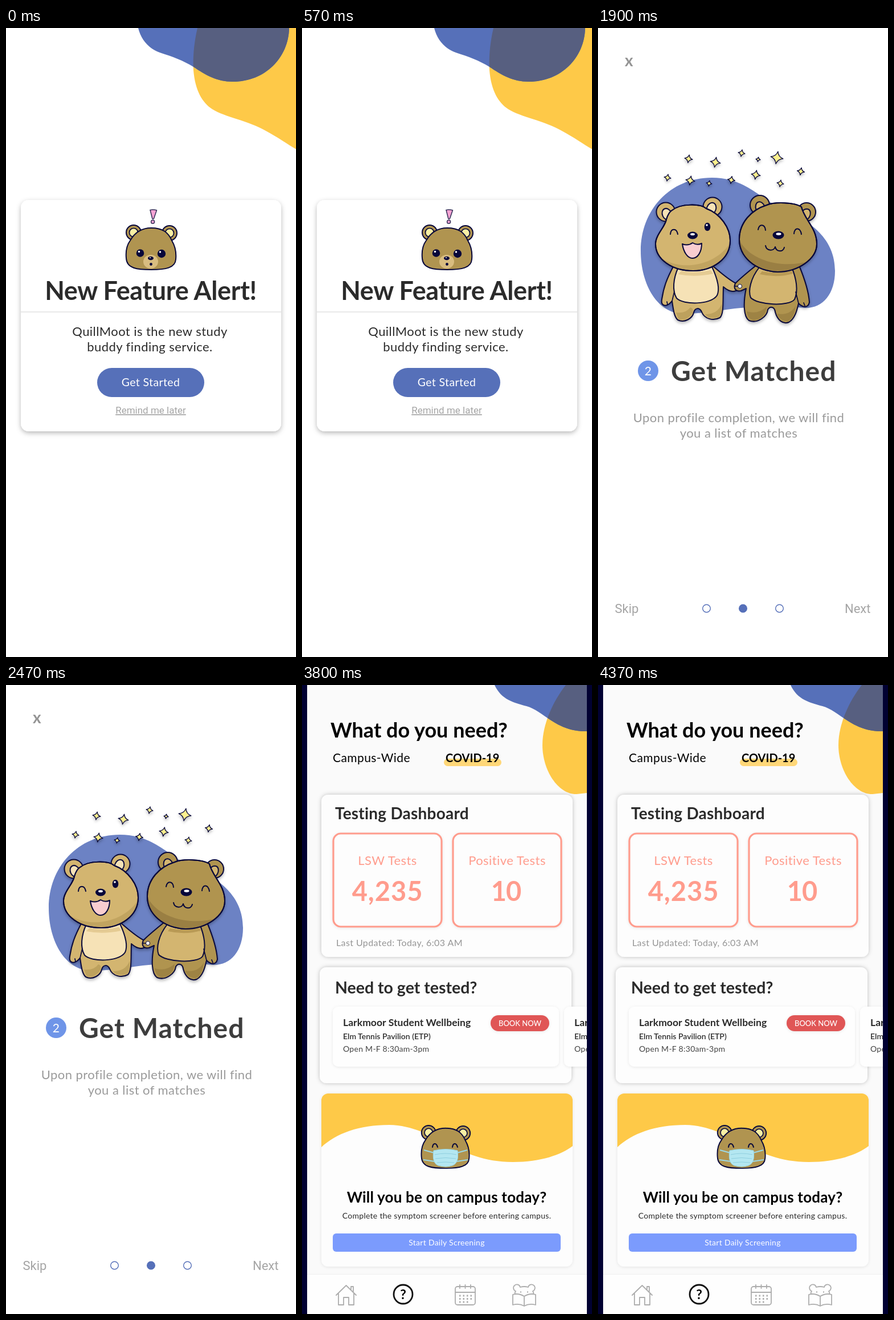
Write an HTML page that moves like this. It is 509 px wide and 1101 px high and loops after 4750 ms.

```html
<!DOCTYPE html>
<html lang="en">
<head>
<meta charset="utf-8">
<title>Study app onboarding</title>
<style>
  html, body { margin: 0; width: 100%; height: 100%; overflow: hidden; background: #fff; }
  svg { display: block; width: 100vw; height: 100vh; }
  text { font-family: Lato, "Open Sans", sans-serif; letter-spacing: .02em; fill: #2b2b2b; }
  .mid { text-anchor: middle; }
  .semi { font-weight: 600; }
  .bold { font-weight: 700; }
  .title { font-size: 48px; font-weight: 700; fill: #3d3d3d; letter-spacing: .022em; }
  .note { font-size: 22px; fill: #9a9a9a; text-anchor: middle; }
  .ui { font-family: Roboto, sans-serif; font-size: 22px; fill: #a5a5a5; letter-spacing: 0; }
  .num { font-size: 21px; fill: #fff; text-anchor: middle; }
  .small { font-size: 14px; }
  .white { fill: #fff; }
  .black { fill: #000; }
  .coral text { fill: #ff9c8d; }
  .ink { stroke: #07073a; stroke-width: 2.6; stroke-linecap: round; stroke-linejoin: round; }
  .fine { stroke-width: 2; }
  .thin { stroke-width: 1.7; }
  .thick { stroke-width: 3.2; }
  .line { fill: none; }
  .dark { fill: #b09450; }
  .light { fill: #d3b570; }
  .cream { fill: #f6e2b6; }
  .shade { fill: #93793f; }
  .navy { fill: #07073a; }
  .blue { fill: #5670b9; }
  .yellow { fill: #fec948; }
  .icon { fill: none; stroke: #adadad; stroke-width: 1.8; stroke-linejoin: round; stroke-linecap: round; }
</style>
</head>
<body>
<svg viewBox="0 0 509 1101" preserveAspectRatio="none">
  <defs>
    <filter id="soft" x="-20%" y="-20%" width="140%" height="150%">
      <feDropShadow dx="0" dy="3" stdDeviation="2.5" flood-color="#000" flood-opacity=".27"/>
    </filter>
    <filter id="card" x="-10%" y="-10%" width="120%" height="125%">
      <feDropShadow dx="0" dy="3" stdDeviation="4" flood-color="#000" flood-opacity=".28"/>
    </filter>
    <filter id="panel" x="-10%" y="-10%" width="120%" height="120%">
      <feDropShadow dx="0" dy="0" stdDeviation="3.5" flood-color="#000" flood-opacity=".25"/>
    </filter>
    <filter id="faint" x="-10%" y="-10%" width="120%" height="130%">
      <feDropShadow dx="0" dy="1" stdDeviation="2.5" flood-color="#000" flood-opacity=".09"/>
    </filter>
    <path id="sunA" d="M336 0C329 30 328 55 329 74C332 110 345 131 362 142C384 156 425 162 456 180C477 191 493 203 509 212V0Z"/>
    <path id="skyA" d="M232 0C237 20 250 36 270 43C292 50 311 57 329 68C350 82 370 94 398 94C455 94 496 52 497 0Z"/>
    <path id="sunB" d="M463 0C441 28 422 68 422 105C422 150 450 192 482 191L500 189V0Z"/>
    <path id="skyB" d="M338 0C350 26 372 31 394 37C424 45 446 82 500 81V0Z"/>
    <path id="headL" d="M130 319C145 307 180 307 190 316C215 325 232 350 232 372C232 405 200 425 167 425C130 425 101 405 101 378C101 362 118 348 120 335C122 328 125 322 130 319Z"/>
    <path id="headR" d="M296 310C310 304 345 305 357 313C362 335 384 350 384 378C384 405 350 427 315 427C275 425 248 400 248 370C248 340 270 318 296 310Z"/>
    <path id="star" d="M0-1Q.18-.18 1 0Q.18.18 0 1Q-.18.18-1 0Q-.18-.18 0-1Z"/>
    <clipPath id="inSunA"><use href="#sunA"/></clipPath>
    <clipPath id="inSunB"><use href="#sunB"/></clipPath>
    <clipPath id="inHeadL"><use href="#headL"/></clipPath>
    <clipPath id="inHeadR"><use href="#headR"/></clipPath>
    <clipPath id="screen"><rect x="9" width="491" height="1101"/></clipPath>
    <clipPath id="promo"><rect x="34" y="715" width="441" height="303" rx="12"/></clipPath>
    <g id="face" class="ink fine">
      <circle class="dark" cx="224" cy="358" r="13"/>
      <circle class="dark" cx="287" cy="359" r="13"/>
      <g class="thin" fill="#f8efa4">
        <circle cx="224" cy="358" r="7.5"/><circle cx="287" cy="359" r="7.5"/>
      </g>
      <path class="dark" d="M255 350C275 350 285 358 291 372C297 382 299 395 298 405C297 420 280 423 255 423C230 423 212 421 211 403C210 392 212 380 218 372C226 358 238 350 255 350Z"/>
    </g>
  </defs>

  <g class="scene">
    <rect width="509" height="1101" fill="#fff"/>
    <use href="#sunA" class="yellow"/>
    <use href="#skyA" class="blue"/>
    <use href="#skyA" fill="#575f80" clip-path="url(#inSunA)"/>
    <rect x="26" y="301" width="457" height="405" rx="14" fill="#fff" filter="url(#card)"/>
    <path d="M26 497H483" stroke="#e2e2e2" stroke-width="1.5"/>
    <use href="#face"/>
    <ellipse cx="254" cy="409" rx="13" ry="12" fill="#d9bd80"/>
    <g class="navy">
      <circle cx="235.5" cy="394" r="6.8"/><circle cx="273" cy="395" r="7.2"/>
      <ellipse cx="254" cy="403" rx="5" ry="3.2"/><circle cx="254.5" cy="413.5" r="2.4"/>
    </g>
    <g class="white">
      <circle cx="233.5" cy="391.5" r="1.7"/><circle cx="270.5" cy="392" r="1.7"/><circle cx="253" cy="402" r="1"/>
    </g>
    <g fill="#f6a3d3" stroke="#34305a" stroke-width="1.5" stroke-linejoin="round">
      <path d="M253 318.500Q259 317.500 264.500 319L259.500 333.500Q258 335 256.800 333.500Z"/>
      <circle cx="257.6" cy="339.3" r="3"/>
    </g>
    <text class="mid bold" x="254" y="476" font-size="45" style="letter-spacing:-.008em">New Feature Alert!</text>
    <text class="mid" x="252.5" y="539" font-size="22">QuillMoot is the new study</text>
    <text class="mid" x="252.5" y="566" font-size="22">buddy finding service.</text>
    <rect class="blue" x="160" y="595" width="188" height="51" rx="25.5"/>
    <text class="mid white" x="254" y="627" font-size="19.5">Get Started</text>
    <text class="ui mid" x="254" y="675" style="font-size:17px" text-decoration="underline">Remind me later</text>
  </g>

  <g class="scene">
    <rect width="509" height="1101" fill="#fff"/>
    <path filter="url(#soft)" fill="#fdc3bd" d="M248 293C305 293 401 335 401 405C401 435 385 452 355 464C310 480 260 517 190 518C140 518 110 490 110 458C110 425 150 405 172 366C195 325 200 293 248 293Z"/>
    <g class="ink" filter="url(#soft)">
      <path d="M117 418L152 474" style="stroke-width:12"/>
      <path d="M117 418L152 474" style="stroke:#fbb9e6;stroke-width:7"/>
      <rect x="154" y="476" width="73" height="8" rx="4" fill="#fbb9e6"/>
      <path fill="#57a6fb" d="M146 485H229V517H219C215 482 159 482 156 517H146Z"/>
      <path class="dark" d="M237 311C262 306 282 313 299 331C331 361 346 404 357 448C363 472 367 490 357 505C347 517 330 517 300 517C280 517 270 518 258 517C246 515 245 505 240 495L227 467L252 406C251 397 243 394 232 394C218 396 202 398 194 390C188 386 187 381 193 376C200 369 203 362 203 352C204 334 216 316 237 311Z"/>
    </g>
    <path class="light" d="M238 312C262 307 282 314 298 332C326 358 340 391 348 425C337 432 323 424 315 408L290 455L228 420L253 403L275 378C268 360 262 382 232 385C214 390 199 388 196 379C202 372 205 360 205 350C206 332 220 317 238 312Z"/>
    <path class="dark" d="M197 383C215 390 237 389 251 381C261 375 266 369 272 371L275 378C262 382 258 395 252 404C249 397 242 393 232 393C218 395 204 395 197 389Z"/>
    <path class="light" d="M228 468L240 487C254 489 264 475 288 474C306 475 312 484 326 481C316 461 297 452 277 459C264 462 258 474 248 473L244 466Z"/>
    <path class="light" d="M275 378C262 382 258 395 250 405C240 418 220 430 203 445C197 455 198 465 203 471C208 476 215 473 217 466C240 466 275 466 290 457C310 445 318 420 314 392Z"/>
    <path class="dark" d="M315 399C302 417 307 433 284 442C257 453 222 448 208 463C205 470 207 474 211 473Q215 472 217 466C240 466 275 466 290 457C310 445 317 425 315 399Z"/>
    <g class="ink line">
      <path d="M275 378C262 382 258 395 250 405C240 418 220 430 203 445C197 455 198 465 203 471C208 476 215 473 217 466C240 466 275 466 290 457C310 445 318 420 314 392"/>
      <path d="M243 467L250 474L261 467M287 456C306 454 319 462 327 481"/>
      <path class="light" d="M236 309C238 294 255 295 256 309V320"/>
      <ellipse cx="241.5" cy="312.5" rx="5.8" ry="10" fill="#faf3a0" transform="rotate(8 241 312)"/>
    </g>
    <ellipse class="navy" cx="216" cy="357.5" rx="6" ry="8.5" transform="rotate(-12 216 357)"/>
    <circle class="white" cx="214" cy="354" r="2"/>
    <ellipse class="navy" cx="193" cy="382.5" rx="4.8" ry="6.5" transform="rotate(15 193 382)"/>
    <circle cx="147" cy="603" r="18" fill="#ef9090" filter="url(#soft)"/>
    <text class="num" x="147" y="611">1</text>
    <text class="title" x="189" y="621" style="letter-spacing:.012em" filter="url(#soft)">Sign Up</text>
    <text class="note" x="254.5" y="692">Complete your profile in less than 5</text>
    <text class="note" x="255" y="719">minutes to get the best pairing</text>
    <g class="nav"></g>
  </g>

  <g class="scene">
    <rect width="509" height="1101" fill="#fff"/>
    <path fill="#6c82c4" d="M200 262C260 262 285 300 320 315C375 338 416 370 416 425C416 465 395 490 365 490C330 487 290 486 240 491C210 495 180 500 150 500C105 500 75 450 75 390C75 320 125 262 200 262Z"/>
    <g id="stars" class="ink" fill="#fdf08d" filter="url(#soft)"></g>
    <g class="ink fine" filter="url(#soft)">
      <path class="light" d="M133 416C120 440 115 455 112 475C110 486 118 488 125 483L130 478C132 490 133 505 140 511C152 517 166 508 168 498C170 490 178 488 182 497C187 510 203 513 214 507C221 500 219 480 220 453C226 458 233 463 242 460C248 457 248 451 242 447C228 440 215 428 202 417Z"/>
      <path class="dark" d="M277 416C262 428 250 438 241 447C237 456 242 462 251 460L260 456C255 480 255 505 265 512C280 518 297 505 298 493C302 486 310 488 311 497C315 512 325 519 335 515C347 508 350 490 352 482C360 490 369 490 371 480C370 465 363 440 353 416Z"/>
      <path class="cream" d="M141 419C132 438 130 460 138 473C150 485 198 485 209 468C215 455 208 435 200 418Z"/>
      <path class="light" d="M283 419C268 438 263 460 268 472C280 485 335 488 345 475C352 460 348 438 340 419Z"/>
      <path class="line thin" d="M130 478L134 461M352 482L347 462M122 484L121 479M363 486L361 481M240 452H245"/>
      <circle class="light" cx="119" cy="322" r="16.5"/><circle class="light" cx="201" cy="313" r="16.5"/>
      <circle class="dark" cx="284" cy="310" r="17"/><circle class="dark" cx="366" cy="322" r="16"/>
      <ellipse class="cream" cx="121" cy="326" rx="8" ry="10.5" transform="rotate(-25 121 326)"/>
      <ellipse class="cream" cx="199" cy="316" rx="8" ry="10.5" transform="rotate(20 199 316)"/>
      <ellipse class="light" cx="285" cy="315" rx="8" ry="11" transform="rotate(-20 285 315)"/>
      <ellipse class="light" cx="364" cy="327" rx="8" ry="11" transform="rotate(30 364 327)"/>
      <use href="#headL" class="light"/>
      <use href="#headR" class="dark"/>
    </g>
    <path class="dark" opacity=".5" clip-path="url(#inHeadL)" d="M100 392C125 425 200 426 233 375V430H100Z"/>
    <path class="shade" opacity=".75" clip-path="url(#inHeadR)" d="M247 368C260 402 315 424 372 408V430H247Z"/>
    <path fill="#e5cb93" d="M146 425Q168 430 198 424L202 430Q170 437 141 431Z"/>
    <path fill="#b99a55" d="M288 426Q315 431 340 425L342 430Q315 438 284 431Z"/>
    <path class="dark" opacity=".6" d="M137 498Q154 500 162 489Q168 490 166 499Q154 515 141 509ZM188 501Q210 501 217 483Q218 503 212 506Q195 511 188 501Z"/>
    <path class="shade" opacity=".6" d="M261 496Q281 502 296 488Q294 508 274 512Q263 510 261 496ZM314 500Q337 504 347 486Q345 507 334 513Q320 514 314 500Z"/>
    <g class="ink line fine">
      <use href="#headL"/><use href="#headR"/>
      <path d="M127 361C128 350 138 350 140 361M281 353C283 342 293 343 294 354M344 360C345 348 355 349 357 361"/>
      <path fill="#f9cdd0" d="M148 378Q158 382 166 376Q174 381 182 377C182 392 175 403 166 403C157 403 150 392 148 378Z"/>
      <path d="M294 381C296 391 309 391 311 383C313 392 325 393 327 384"/>
    </g>
    <g class="navy">
      <ellipse cx="166" cy="363" rx="9" ry="6.5"/><ellipse cx="316.5" cy="362.5" rx="10" ry="7"/>
      <ellipse cx="192" cy="348" rx="5.3" ry="7.3"/>
    </g>
    <g class="white">
      <ellipse cx="166" cy="361" rx="4" ry="2"/><ellipse cx="317" cy="360.5" rx="4.5" ry="2.2"/>
      <circle cx="191" cy="345" r="1.8"/><circle cx="249" cy="452" r="3.5" stroke="#07073a"/>
    </g>
    <circle cx="88" cy="600" r="18" fill="#6f95e8"/>
    <text class="num" x="88" y="608">2</text>
    <text class="title" x="128" y="618">Get Matched</text>
    <text class="note" x="247" y="690">Upon profile completion, we will find</text>
    <text class="note" x="247" y="717">you a list of matches</text>
    <g class="nav"></g>
  </g>

  <g class="scene">
    <rect width="509" height="1101" fill="#fff"/>
    <path filter="url(#soft)" fill="#fdd77c" d="M250 250C310 250 415 305 415 375C415 410 395 435 345 447C300 460 260 500 185 501C140 501 101 470 101 435C101 400 140 380 162 345C190 300 195 250 250 250Z"/>
    <g class="ink thick" filter="url(#soft)">
      <path class="dark" d="M178 289C200 279 225 284 240 293C250 293 258 294 264 300C266 312 262 325 250 332C240 340 235 350 242 360C248 370 260 375 275 380L300 420C304 428 304 433 303 437C313 441 321 447 328 450C335 439 345 438 347 448C345 462 335 478 327 491C295 490 265 493 235 491C215 490 195 480 182 455C170 430 158 395 152 362C148 335 153 310 165 297Z"/>
    </g>
    <path class="light" d="M178 291C200 281 225 286 240 295L256 297L263 305C264 317 258 325 249 331C232 339 222 346 214 365L250 382L200 430L183 391L179 405Q172 413 167 403C160 387 157 374 154 362C150 335 155 312 166 299Z"/>
    <path class="dark" d="M213 364C219 348 212 344 225 338C239 332 249 333 259 322L250 332C240 340 235 350 242 360C247 368 256 374 264 378L246 380C233 369 224 363 213 364Z"/>
    <path class="light" d="M255 458C262 440 285 432 305 437L328 450C335 440 345 440 345 449Q340 460 327 466C313 465 296 445 276 447Q262 449 255 458Z"/>
    <path class="light" d="M184 390C195 420 220 437 245 437C275 437 320 425 323 400C325 388 320 382 312 385L305 373C300 365 288 372 283 384C255 385 235 362 214 365Z"/>
    <path class="dark" d="M189 400C212 429 253 418 272 410C296 400 313 409 322 390C325 422 275 437 245 437C218 437 197 420 189 400Z"/>
    <g class="ink line thick">
      <path d="M184 390C195 420 220 437 245 437C275 437 320 425 323 400C325 388 320 382 312 385M214 365C235 362 255 385 281 384C287 372 300 364 305 374M242 360C248 372 262 376 273 381M255 458C262 440 285 432 305 437L328 450"/>
      <path class="thin" d="M228 297C219 294 215 301 219 308Q222 311 226 309M246 321Q249 326 256 326"/>
      <path class="light" d="M172 316C158 309 154 298 160 292C169 290 179 296 181 304"/>
    </g>
    <path class="ink cream thin" d="M163 294C173 293 180 299 181 305C171 308 164 302 163 294Z"/>
    <ellipse class="navy" cx="259" cy="299" rx="7" ry="5.5" transform="rotate(25 259 299)"/>
    <g fill="none" stroke-linecap="round">
      <path d="M305 385L327 357" stroke="#07073a" stroke-width="10.5" stroke-linecap="square"/>
      <path d="M309 386L329 360" stroke="#8c90a8" stroke-width="1.2"/>
      <path d="M289 358L300 367M302 347L310 361M312 337L319 352" stroke="#fffbe8" stroke-width="2.5"/>
    </g>
    <path class="ink thin" fill="#f5bdf0" filter="url(#soft)" d="M301 268L347 270Q350 270 350 273L348 303Q348 306 345 306L327 305L321 314L316 304L299 303Q296 303 297 300L298 271Q298 268 301 268Z"/>
    <path d="M304 276L341 278M304 284L326 285M331 285.500L340 286M303 292L340 295" stroke="#fff" stroke-width="1.8" opacity=".85"/>
    <circle cx="138.5" cy="596.5" r="18" fill="#fdbb24"/>
    <text class="num" x="138" y="604.5">3</text>
    <text class="title" x="176" y="615" style="font-size:49px;letter-spacing:.025em">Connect</text>
    <text class="note" x="262" y="686" style="letter-spacing:.028em">Get connected through your choice</text>
    <text class="note" x="262" y="713" style="letter-spacing:.028em">of contact and start studying!</text>
    <rect class="blue" x="148" y="837" width="228" height="52" rx="26"/>
    <text class="mid white" x="262" y="870" font-size="18.5" font-weight="500">Let’s get started!</text>
    <g class="nav"></g>
  </g>

  <g class="scene">
    <rect width="509" height="1101" fill="#010132"/>
    <g clip-path="url(#screen)">
      <rect x="9" width="491" height="1101" fill="#fafafa"/>
      <use href="#sunB" class="yellow"/>
      <use href="#skyB" class="blue"/>
      <use href="#skyB" fill="#575f80" clip-path="url(#inSunB)"/>
      <text class="bold black" x="50" y="92" font-size="36" style="letter-spacing:0">What do you need?</text>
      <text class="black" x="54" y="135" font-size="21">Campus-Wide</text>
      <rect x="249" y="129" width="101" height="13" rx="6.5" fill="#ffd778"/>
      <text class="bold black" x="252" y="135" font-size="20" style="letter-spacing:0">COVID-19</text>

      <g fill="#fdfdfd" filter="url(#panel)">
        <rect x="34" y="192" width="441" height="284" rx="12"/>
        <rect x="31" y="494" width="442" height="203" rx="12"/>
      </g>
      <text class="bold" x="58" y="235" font-size="28" style="letter-spacing:.008em">Testing Dashboard</text>
      <g fill="#fdfdfd" stroke="#ff9c8d" stroke-width="3.2" filter="url(#faint)">
        <rect x="55" y="260" width="190" height="163" rx="13"/>
        <rect x="265" y="260" width="190" height="163" rx="13"/>
      </g>
      <g class="mid coral">
        <text x="150" y="315" font-size="22">LSW Tests</text>
        <text x="360" y="315" font-size="22">Positive Tests</text>
        <text class="bold" x="150" y="378" font-size="47">4,235</text>
        <text class="bold" x="358" y="378" font-size="47" style="letter-spacing:-.02em">10</text>
      </g>
      <text x="60" y="457" font-size="16" style="fill:#959595;letter-spacing:.025em">Last Updated: Today, 6:03 AM</text>

      <text class="bold" x="58" y="540" font-size="28.5" style="letter-spacing:0">Need to get tested?</text>
      <g fill="#fefefe" filter="url(#faint)">
        <rect x="54" y="563" width="397" height="105" rx="10"/>
        <rect x="460" y="563" width="397" height="105" rx="10"/>
      </g>
      <g id="places"></g>
      <rect x="331" y="578" width="103" height="28" rx="14" fill="#e05656" filter="url(#faint)"/>
      <text class="mid white" x="382.5" y="597" font-size="13" font-weight="500" style="letter-spacing:0">BOOK NOW</text>

      <rect x="34" y="715" width="441" height="303" rx="12" fill="#fdfdfd" filter="url(#faint)"/>
      <path class="yellow" clip-path="url(#promo)" d="M34 809C60 785 100 770 153 770C235 772 270 835 370 835C420 835 455 822 475 807V715H34Z"/>
      <use href="#face" transform="translate(7.2 439.8) scale(.96)"/>
      <path class="ink line fine" d="M229 809C230 801 236 801 238 809M264 809C265 801 271 801 273 809"/>
      <path d="M214 814L232 819M290 814L272 819M213 831L233 834M291 831L271 834" stroke="#9bd8e6" stroke-width="2.2"/>
      <path fill="#b4e7f1" stroke="#9bd8e6" d="M231 815Q252 810 273 815C275 830 272 838 264 841Q252 845 239 841C231 838 229 828 231 815Z"/>
      <path fill="none" stroke="#8fcfdf" d="M233 822Q252 818 271 822M234 829Q252 826 270 829M237 836Q252 834 267 836"/>
      <text class="mid bold black" x="254" y="906" font-size="26" style="letter-spacing:.008em">Will you be on campus today?</text>
      <text class="mid small" x="254" y="934">Complete the symptom screener before entering campus.</text>
      <rect x="54" y="960" width="400" height="32" rx="6" fill="#7b9bfd"/>
      <text class="mid small white" x="254" y="981">Start Daily Screening</text>

      <rect x="9" y="1032" width="491" height="69" fill="#fefefe"/>
      <path d="M9 1031.500H500" stroke="#f0f0f0"/>
      <g class="icon">
        <path d="M60 1068L77.500 1051L95 1068M64 1065V1085H73V1072H82V1085H91V1065M86 1058V1053H90V1062"/>
        <rect x="269" y="1053" width="35" height="32" rx="4"/>
        <path d="M269 1063H304M277 1050V1056M286.500 1050V1056M296 1050V1056"/>
        <path d="M276 1069H299M276 1074.500H299M276 1080H293" stroke-width="3" stroke-dasharray="2.5 4" stroke-linecap="butt"/>
        <path d="M390 1070Q380 1064 370 1067V1085Q381 1082 390 1087Q399 1082 410 1085V1067Q400 1064 390 1070V1087"/>
        <path d="M374 1066Q373 1064 375 1061A6 6 0 1 1 383 1054Q390 1052 397 1054A6 6 0 1 1 405 1061Q407 1064 406 1066M384 1062V1063M396 1062V1063"/>
      </g>
      <circle cx="177.5" cy="1066.5" r="16.5" fill="none" stroke="#111" stroke-width="2.8"/>
      <text class="mid bold black" x="177.5" y="1075" font-size="23" style="letter-spacing:0">?</text>
    </g>
  </g>
</svg>
<script>
  const HOLD = 950;
  const scenes = [...document.querySelectorAll('.scene')];
  const byId = id => document.getElementById(id);

  // Close mark, page dots and footer links shared by the three steps
  document.querySelectorAll('.nav').forEach((nav, step) => {
    const dots = [0, 1, 2].map(i =>
      `<circle cx="${190.5 + 64 * i}" cy="1016" r="6.8" stroke="#5670b9" stroke-width="1.4" fill="${i === step ? '#5670b9' : '#fff'}"/>`);
    const links = step < 2
      ? '<text class="ui" x="29.5" y="1024">Skip</text><text class="ui" x="433" y="1024">Next</text>' : '';
    nav.innerHTML = '<text class="bold" x="47" y="67" font-size="28" style="fill:#959595">x</text>' + dots.join('') + links;
  });

  // x, y, radius
  const sparkles = [
    [159, 229, 7], [206, 235, 9], [252, 219, 6], [281, 230, 4], [314, 227, 11], [122, 262, 6],
    [162, 267, 8], [195, 272, 5], [234, 266, 6.5], [277, 257, 8], [320, 272, 6], [356, 251, 6.5]
  ];
  byId('stars').innerHTML = sparkles.map(([x, y, r]) =>
    `<use href="#star" transform="translate(${x} ${y}) rotate(10) scale(${r})" style="stroke-width:${1.3 / r}"/>`).join('');

  byId('places').innerHTML = [72, 478].map(x =>
    `<text class="bold" x="${x}" y="597" font-size="17.5" style="letter-spacing:.004em">Larkmoor Student Wellbeing</text>
     <text class="semi small" x="${x}" y="620" style="letter-spacing:0">Elm Tennis Pavilion (ETP)</text>
     <text class="small" x="${x}" y="642" style="fill:#444">Open M-F 8:30am-3pm</text>`).join('');

  function draw(time) {
    const current = Math.floor(time / HOLD) % scenes.length;
    scenes.forEach((scene, i) => { scene.style.display = i === current ? '' : 'none'; });
  }

  const start = performance.now();
  function tick() {
    draw(performance.now() - start);
    requestAnimationFrame(tick);
  }
  tick();
</script>
</body>
</html>
```
